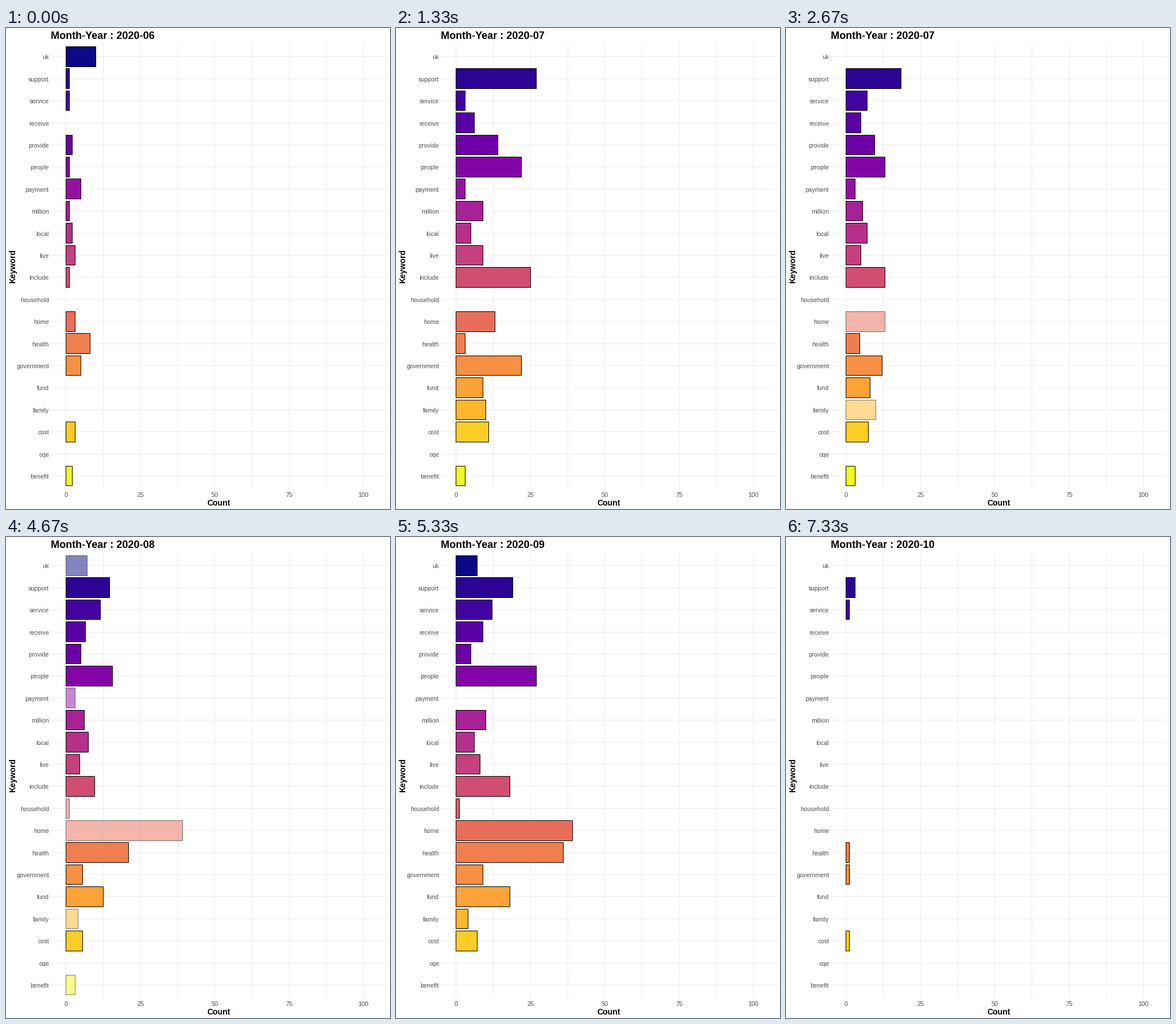
A matplotlib script that plays this animation: 669x837 px, repeating every 8 s.

```python
import math

import matplotlib.pyplot as plt
import numpy as np
from matplotlib.animation import FuncAnimation
from matplotlib.patches import Rectangle

W, H, DPI = 669, 837, 64
PX = 72 / DPI                    # one pixel in points
LOOP, STEP = 8000, 40            # ms
STAGES = 12                      # pose changes per loop

WORDS = ("uk support service receive provide people payment million local live "
         "include household home health government fund family cost oqe "
         "benefit").split()


def curve(n, low, high, power):
    return np.rint(low + (high - low) * np.linspace(0, 1, n) ** power)


# per month: rising counts and the words that reach each of them
LADDERS = {
    "2020-06": (curve(6, 1, 10, 1.4),
                "support service people million include | provide local benefit | "
                "live home cost | payment government | health | uk"),
    "2020-07": ([3, 5, 6, *range(9, 12), 13, 14, 22, 25, 27],
                "service payment health benefit | local | receive | "
                "million live fund | family | cost | home | provide | "
                "people government | include | support"),
    "2020-08": (curve(10, 1, 11, 1.1),
                "live include | million government | payment benefit | "
                "receive people cost | provide | health | fund | local | "
                "support | service"),
    "2020-09": ([1, *range(4, 11), 12, 18, 19, 27, 36, 39],
                "household | family | provide | local | uk cost | live | "
                "receive government | million | service | include fund | "
                "support | people | health | home"),
    "2020-10": ([1, 3], "service health government cost | support"),
}
MONTHS = list(LADDERS)


def tally(month):
    counts, groups = LADDERS[month]
    return {word: count for count, group in zip(counts, groups.split("|"))
            for word in group.split()}


TALLIES = [tally(month) for month in MONTHS]

LEFT, RIGHT, TOP, BOTTOM = 78, 664, 26, 802
ROW0, ROW_H = 49.8, 38.41
GRID, TICK = "#EBEBEB", "#4D4D4D"

plt.rcParams["font.family"] = "Liberation Sans"
fig = plt.figure(figsize=(W / DPI, H / DPI), dpi=DPI, facecolor="white")
ax = fig.add_axes([0, 0, 1, 1])
ax.set_xlim(0, W)
ax.set_ylim(H, 0)
ax.axis("off")


def mid_px(v):
    """Centre of the pixel that holds v."""
    return math.floor(v) + 0.5


def count_x(count):
    return mid_px(104.99 + 5.18 * count)


def row_y(i, offset=0):
    return mid_px(ROW0 + (i + offset) * ROW_H)


def line(xs, ys):
    ax.plot(xs, ys, color=GRID, lw=PX, solid_capstyle="butt", snap=False, zorder=1)


def label(x, y, text, size, **kw):
    return ax.text(x, y, text, fontsize=size * PX, va="baseline", **kw)


for k in range(9):
    x = count_x(12.5 * k)
    line([x, x], [TOP, BOTTOM])
    if k % 2 == 0:
        label(x, 816, f"{12.5 * k:.0f}", 11, ha="center", color=TICK)

bars = []
colors = plt.get_cmap("plasma")(np.linspace(0, 1, len(WORDS)))
for i, (word, color) in enumerate(zip(WORDS, colors)):
    y, top, bottom = row_y(i), row_y(i, -0.45), row_y(i, 0.45)
    line([LEFT, RIGHT], [y, y])
    label(75, y + 4.5, word, 10.6, ha="right", color=TICK)
    bar = Rectangle((count_x(0), top), 1, bottom - top, facecolor=color,
                    edgecolor="black", lw=PX, snap=False, zorder=2)
    bars.append(ax.add_patch(bar))

label(371, 831, "Count", 14, ha="center", weight="bold")
label(16, 414.5, "Keyword", 14, ha="center", weight="bold", rotation=90,
      rotation_mode="anchor")
title = label(78, 19, "", 18, ha="left", weight="bold")


def pose(stage):
    """Month shown, next month and progress between them."""
    if stage % 3 == 1:
        month = stage // 3
        return month, month + 1, 0.5
    month = (stage + 1) // 3
    return month, month, 0.0


def draw(frame):
    stage = int((frame * STEP + 30) * STAGES / LOOP)
    now, nxt, f = pose(stage)
    title.set_text("Month-Year : " + MONTHS[now])
    for word, bar in zip(WORDS, bars):
        a, b = TALLIES[now].get(word, 0), TALLIES[nxt].get(word, 0)
        if a and b:
            count, alpha = a + (b - a) * f, 1
        else:
            # bars that enter or leave fade at full length
            count, alpha = a or b, (1 - f) if a else f
        bar.set_visible(count > 0 and alpha > 0)
        bar.set_width(count_x(count) - count_x(0))
        bar.set_alpha(alpha)
    return [title, *bars]


anim = FuncAnimation(fig, draw, frames=LOOP // STEP, interval=STEP,
                     init_func=lambda: draw(0), repeat=True, repeat_delay=0)
plt.show()
```
